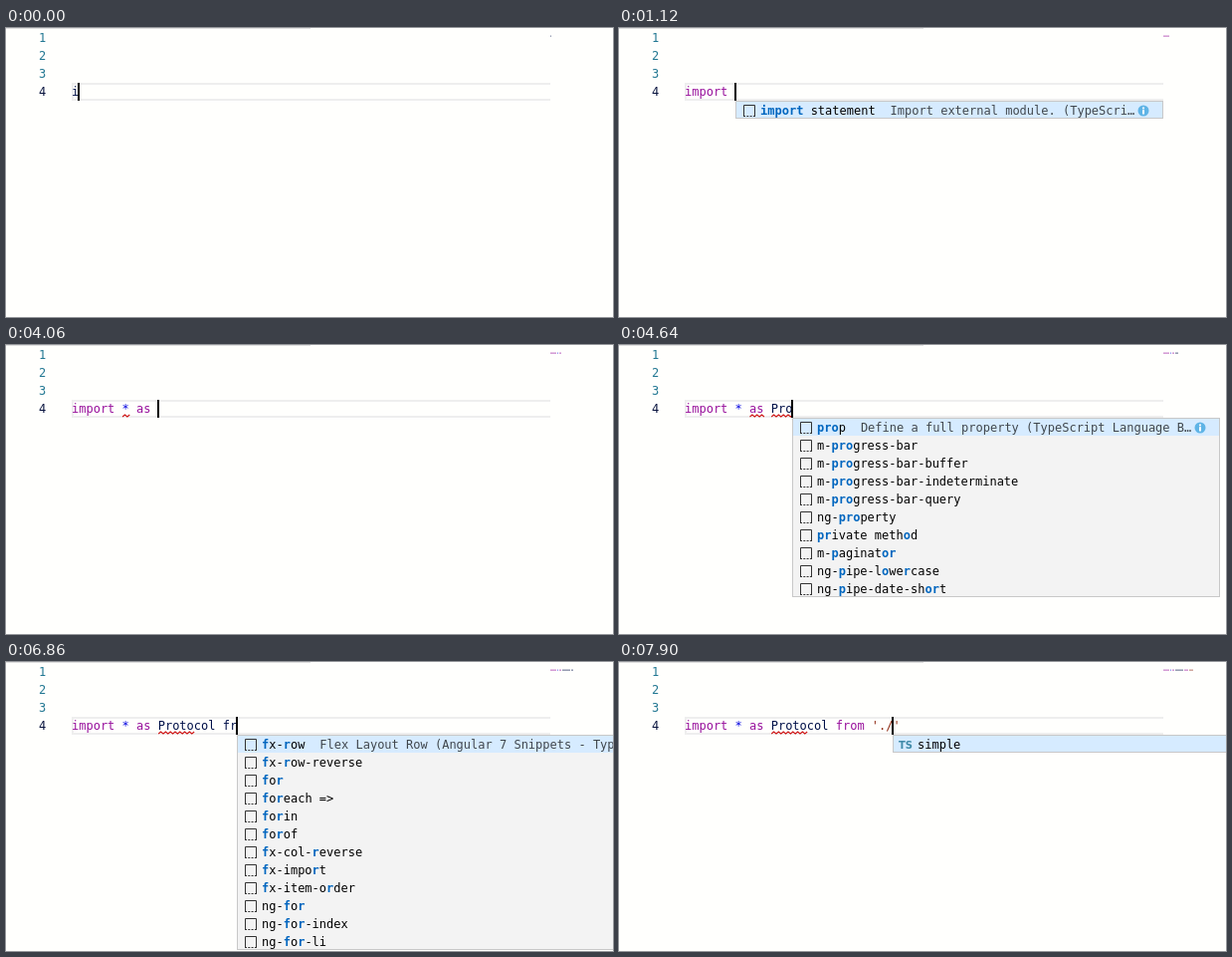
Recreate the animation shown at these times as an HTML page. Size 610 px wide and 290 px high, loop 8 s.

```html
<!DOCTYPE html>
<html lang="en">
<head>
<meta charset="utf-8">
<title>Typing an import</title>
<style>
html, body { margin: 0; width: 100%; height: 100%; overflow: hidden; background: #fffffd; }
svg { display: block; }
text { font: 12px "DejaVu Sans Mono", monospace; white-space: pre; }
.match { font-weight: bold; fill: #0066bf; }
.ts { font: bold 10px "DejaVu Sans", sans-serif; }
</style>
</head>
<body>
<svg id="stage" width="610" height="290" viewBox="0 0 610 290"></svg>
<script>
const LOOP = 8000, CHAR = 7.224, LEFT = 66, ROW = 18, MAP_X = 547;
const LINE = "import * as Protocol from './";

// time at which each character of LINE is typed
const KEYS = [
  0, 180, 340, 500, 640, 860, 1080, 1960, 2300, 3300, 3620, 3820,
  4080, 4260, 4420, 4740, 4880, 5900, 6060, 6240, 6520,
  6680, 6800, 7060, 7300, 7420, 7560, 7680, 7800
];

// first column, end column, colour, column count that triggers the colour
const INK = "#001048", PURPLE = "#98109c";
const TOKENS = [
  [0, 6, PURPLE, 6], [7, 8, "#0000e0", 8], [9, 11, PURPLE, 11],
  [12, 20, INK, 12], [21, 25, PURPLE, 25], [26, 30, "#8f2a12", 27]
];

// start, end, first column, end column
const ERRORS = [
  [2920, 4500, 7, 8], [4500, 5300, 9, 11], [4500, 5300, 12, 15], [5300, LOOP, 12, 17]
];

const IMPORTS = ["import statement", "import", "importScripts", "fx-import", "ng-import",
  "ng-import-forms", "ng-import-http", "ng-import-router", "m-import", "m-import-icon",
  "m-import-table", "m-import-tabs"];
const ASSIGN = ["as", "async", "assert", "abstract class", "class", "case", "fx-align-start",
  "m-tabs", "m-paginator-size", "ng-async", "ng-class", "ng-pipe-async"];
const PROPS = ["prop", "m-progress-bar", "m-progress-bar-buffer", "m-progress-bar-indeterminate",
  "m-progress-bar-query", "ng-property", "private method", "m-paginator",
  "ng-pipe-lowercase", "ng-pipe-date-short", "ng-pipe", "m-step"];
const LOOPS = ["fx-row", "fx-row-reverse", "for", "foreach =>", "forin", "forof",
  "fx-col-reverse", "fx-import", "fx-item-order", "ng-for", "ng-for-index", "ng-for-li"];
const DETAIL = {
  "import statement": "Import external module. (TypeScri…",
  "prop": "Define a full property (TypeScript Language B…",
  "fx-row": "Flex Layout Row (Angular 7 Snippets - TypeScript…"
};

// start, end, items, column where the searched word begins
const POPUPS = [
  [120, 1080, IMPORTS, 0], [1080, 1960, IMPORTS.slice(0, 1), 0],
  [3500, 3860, ASSIGN, 9], [4140, 4900, PROPS, 12],
  [6740, 7340, LOOPS, 21], [7860, LOOP, ["simple"], 29]
];

const stage = document.getElementById("stage");
const colX = n => LEFT + n * CHAR;
const esc = s => s.replace(/&/g, "&amp;").replace(/</g, "&lt;").replace(/>/g, "&gt;");
const rect = (x, y, w, h, fill, more = "") =>
  `<rect x="${x}" y="${y}" width="${w}" height="${h}" fill="${fill}" ${more}/>`;
const text = (x, y, s, fill, more = "") =>
  `<text x="${x}" y="${y}" fill="${fill}" ${more}>${s}</text>`;
const during = (rows, t) => rows.filter(r => t >= r[0] && t < r[1]);

function subsequence(word, query) {
  const hits = [];
  let at = -1;
  for (const c of query) {
    at = word.indexOf(c, at + 1);
    if (at < 0) return null;
    hits.push(at);
  }
  return hits;
}

// fuzzy match that also forgives two swapped neighbours
function fuzzy(word, query) {
  let hits = subsequence(word, query);
  for (let i = 1; !hits && i < query.length - 1; i++) {
    hits = subsequence(word, query.slice(0, i) + query[i + 1] + query[i] + query.slice(i + 2));
  }
  return hits;
}

function label(word, hits) {
  return [...word].map((c, i) =>
    hits.includes(i) ? `<tspan class="match">${esc(c)}</tspan>` : esc(c)).join("");
}

function snippetIcon(x, y) {
  return `<path d="M${x + .5} ${y + 12}V${y + .5}H${x + 11.5}V${y + 12}" fill="none" stroke="#333"/>` +
    `<path d="M${x} ${y + 11.5}h12" stroke="#333" stroke-dasharray="2 1.3"/>`;
}

function infoIcon(x, y) {
  return `<circle cx="${x}" cy="${y}" r="5.5" fill="#5fb4e6"/>` +
    rect(x - 1, y - 3.5, 2, 1.8, "#fff") + rect(x - 1, y - .8, 2, 4.3, "#fff");
}

function popup([, , items, from], typed) {
  const query = typed.slice(from).trim().toLowerCase();
  const rows = items.map(word => [word, fuzzy(word, query)]).filter(r => r[1]);
  if (!rows.length) return "";
  const x = Math.round(colX(typed.length)), y = 73, h = rows.length * ROW;
  let out = rect(x, y, 430, h, "#f3f3f3") + rect(x, y, 430, ROW, "#d6ebff");
  rows.forEach(([word, hits], i) => {
    const top = y + i * ROW, base = top + 14;
    out += word === "simple"
      ? text(x + 6, base, "TS", "#3f8aa8", 'class="ts"')
      : snippetIcon(x + 8, top + 4);
    out += text(x + 25, base, label(word, hits), "#000");
    if (i === 0 && DETAIL[word]) {
      out += text(x + 40 + word.length * CHAR, base, DETAIL[word], "#40474d");
      out += infoIcon(x + 410, top + 10);
    }
  });
  return out + rect(x + .5, y + .5, 429, h - 1, "none", 'stroke="#c8c8c8"');
}

function squiggle(a, b) {
  const end = colX(b);
  let x = colX(a) + .5, d = `M${x} 72`;
  for (let up = true; x + 2.4 <= end + .5; up = !up) {
    x += 2.4;
    d += `L${x.toFixed(1)} ${up ? 70 : 72}`;
  }
  return `<path d="${d}" fill="none" stroke="#d01818" stroke-width="1.1"/>`;
}

function frame(t) {
  const count = KEYS.filter(k => k <= t).length;
  const typed = LINE.slice(0, count);
  const shown = typed + (count >= 27 ? "'" : "");
  const caretOn = (t - KEYS[count - 1]) % 1000 < 500;

  let out = rect(0, 0, 306, 1, "#e0e0e0");
  out += `<path d="M${MAP_X} 56H67V72H${MAP_X}" fill="none" stroke="#eee" stroke-width="2"/>`;
  for (let n = 1; n <= 4; n++) {
    out += text(33, n * ROW - 4, n, n === 4 ? "#0b1640" : "#237893");
  }

  for (const [a, b, fill, need] of TOKENS) {
    const part = shown.slice(a, b).trimEnd();
    if (!part) continue;
    const ink = count >= need ? fill : INK;
    out += text(colX(a), 68, esc(part), ink);
    out += rect(MAP_X + a, 7.5, part.length, 1.3, ink, 'opacity=".5"');
  }
  for (const [, , a, b] of during(ERRORS, t)) out += squiggle(a, b);
  for (const p of during(POPUPS, t)) out += popup(p, typed);
  if (caretOn) out += rect(Math.round(colX(count) - 1), 55, 2, ROW, "#000");
  return out;
}

let last = "";
const start = performance.now();
function tick(now) {
  const out = frame(Math.max(0, now - start) % LOOP);
  if (out !== last) stage.innerHTML = last = out;
  requestAnimationFrame(tick);
}
tick(start);
</script>
</body>
</html>
```
